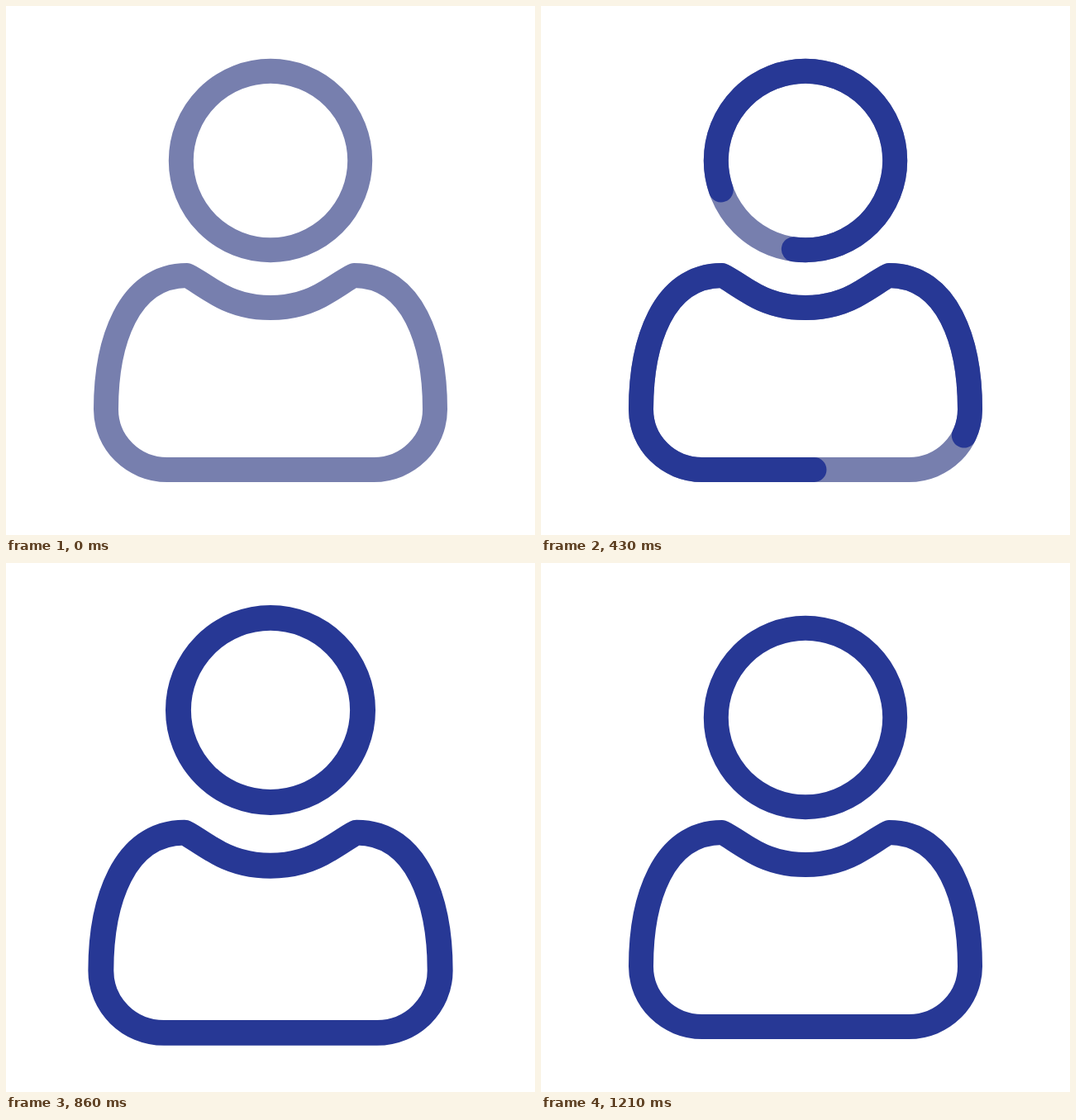
These frames come from a looping animation (640 by 640 pixels, 2000 ms). An HTML page:

```html
<!DOCTYPE html>
<html lang="en">
<head>
<meta charset="utf-8">
<title>User icon</title>
<style>
  html, body { margin: 0; width: 100%; height: 100%; overflow: hidden; background: #fff; }
  svg { display: block; width: 100%; height: 100%; }
  path { fill: none; stroke-width: 30; stroke-linecap: round; stroke-linejoin: round; }
  .base { stroke: #777fae; }
  .ink { stroke: #273895; }
</style>
</head>
<body>
<svg viewBox="0 0 640 640">
  <g id="figure">
    <g id="head">
      <path class="base" d="M211.8 187a108.2 108.2 0 1 0 216.4 0a108.2 108.2 0 1 0 -216.4 0z"/>
      <path class="ink" id="headInk" pathLength="360" d="M211.8 187a108.2 108.2 0 1 0 216.4 0a108.2 108.2 0 1 0 -216.4 0z"/>
    </g>
    <path class="base" id="bodyBase"/>
    <path class="ink" id="bodyInk" pathLength="360"/>
  </g>
</svg>
<script>
  const LOOP = 2000, FPS = 14, DRAW = 520;
  const PIVOT = { x: 320, y: 323 };
  const SWEEP = 100; // degrees the tail of each line travels while drawing

  const BODY = 'M519 488C519 528.5 486 561 445 561H195C154 561 121 528.5 121 488' +
    'C121 408 147 326 219 326C224 327.5 238 338 252 346C272 358.5 296 365 320 365' +
    'C344 365 368 358.5 388 346C402 338 416 327.5 421 326C493 326 519 408 519 488z';

  // [time, scale, head shift]
  const BOUNCE = [[600, 1, 0], [800, 1.051, -15], [1000, 0.95, 37], [1200, 1, 0]];

  const $ = id => document.getElementById(id);
  const figure = $('figure'), head = $('head');
  const headInk = $('headInk'), bodyInk = $('bodyInk');
  const bases = document.querySelectorAll('.base');
  $('bodyBase').setAttribute('d', BODY);
  bodyInk.setAttribute('d', BODY);

  const smooth = x => x * x * (3 - 2 * x);

  function trim(path, p, start) {
    const len = 360 * p;
    path.style.visibility = p > 0 ? 'visible' : 'hidden';
    path.style.strokeDasharray = p < 1 ? `${len} ${360 - len}` : 'none';
    path.style.strokeDashoffset = -(start + SWEEP * p);
  }

  function bounceAt(t) {
    for (let i = 1; i < BOUNCE.length; i++) {
      const [t0, s0, y0] = BOUNCE[i - 1], [t1, s1, y1] = BOUNCE[i];
      if (t >= t0 && t < t1) {
        const e = smooth((t - t0) / (t1 - t0));
        return [s0 + (s1 - s0) * e, y0 + (y1 - y0) * e];
      }
    }
    return [1, 0];
  }

  function draw(t) {
    const p = Math.min(1, t / DRAW);
    trim(headInk, p, 0);
    trim(bodyInk, p, -8.7);
    bases.forEach(b => b.style.visibility = p < 1 ? 'visible' : 'hidden');

    const [s, y] = bounceAt(t);
    figure.setAttribute('transform',
      `translate(${PIVOT.x} ${PIVOT.y}) scale(${s}) translate(${-PIVOT.x} ${-PIVOT.y})`);
    head.setAttribute('transform', `translate(0 ${y})`);
  }

  // Motion is held at 14 steps per second
  let origin = null;
  function tick(now) {
    if (origin === null) origin = now;
    const t = (now - origin) % LOOP;
    const step = Math.floor((t + 4.5) * FPS / 1000) % (LOOP * FPS / 1000);
    draw(step * 1000 / FPS);
    requestAnimationFrame(tick);
  }
  draw(0);
  requestAnimationFrame(tick);
</script>
</body>
</html>
```
